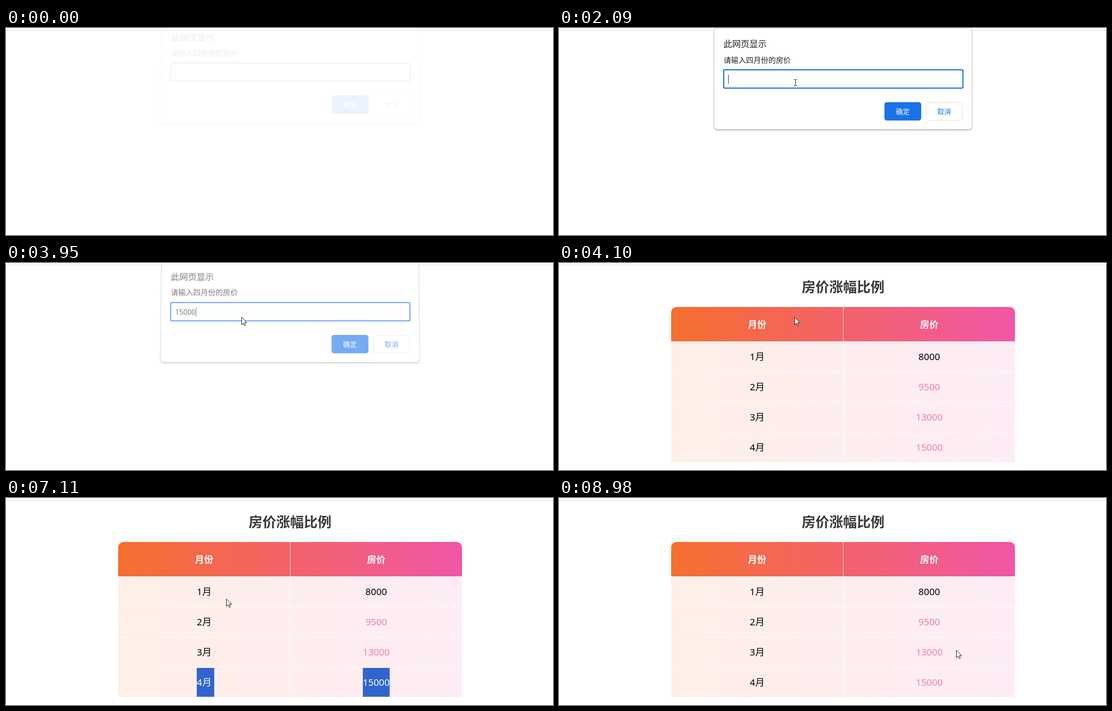
Recreate the animation shown at these times as an HTML page. Size 1190 by 452 pixels, loop 9.57 s.

```html
<!DOCTYPE html>
<html lang="zh">
<head>
<meta charset="utf-8">
<title>房价涨幅比例</title>
<style>
  html, body { margin: 0; width: 100%; height: 100%; overflow: hidden; background: #fff; }
  svg { display: block; }
  text { font-family: "Noto Sans", "Noto Sans CJK SC", "Noto Sans CJK", sans-serif; }
  .layer { position: absolute; left: 0; top: 0; }
  #dialog {
    position: absolute; left: 338px; top: 1px; width: 560px; height: 220px;
    background: #fff; border-radius: 6px;
    box-shadow: 0 0 1.5px rgba(0,0,0,.55), 0 2px 4px rgba(0,0,0,.3);
  }
  #dialog svg { position: absolute; left: -338px; top: -1px; }
</style>
</head>
<body>
<svg class="layer" width="1190" height="452">
  <defs>
    <linearGradient id="warm" gradientUnits="userSpaceOnUse" x1="244" y1="0" x2="992" y2="0">
      <stop offset="0" stop-color="#f56f2e"/>
      <stop offset="1" stop-color="#f056a6"/>
    </linearGradient>
  </defs>
  <rect y="4" width="1190" height="1" fill="#dadada"/>
  <g id="table">
    <text x="618" y="63" font-size="30" font-weight="700" fill="#3a3a3a" text-anchor="middle">房价涨幅比例</text>
    <path d="M244 171V108a12 12 0 0 1 12-12H980a12 12 0 0 1 12 12V171Z" fill="url(#warm)"/>
    <rect x="244" y="171" width="748" height="264" fill="url(#warm)" opacity=".11"/>
    <path d="M618.5 96V435M244 237.5H992M244 303.5H992M244 369.5H992" stroke="#fff"/>
    <g font-size="20" font-weight="700" fill="#fff" text-anchor="middle">
      <text x="431" y="141.5">月份</text>
      <text x="805.5" y="141.5">房价</text>
    </g>
    <g id="cells" font-size="20.5"></g>
  </g>
</svg>

<div id="dialog">
  <svg width="1190" height="452">
    <text x="358" y="42" font-size="18.75" fill="#202124">此网页显示</text>
    <text x="358" y="75.5" font-size="16.25" fill="#202124">请输入四月份的房价</text>
    <rect id="field" x="358.25" y="91.25" width="520.5" height="40" rx="2.5" fill="#fff"/>
    <text id="typed" x="368" y="118" font-size="15.5" fill="#202124"></text>
    <rect id="caret" y="102" width="1" height="20" fill="#202124"/>
    <rect x="708" y="162" width="80" height="40" rx="5" fill="#1a73e8"/>
    <rect x="798.5" y="162.5" width="79" height="39" rx="4.5" fill="#fff" stroke="#dadce0"/>
    <g font-size="15" text-anchor="middle">
      <text x="748" y="188" fill="#fff" font-weight="500">确定</text>
      <text x="838" y="188" fill="#1a73e8">取消</text>
    </g>
  </svg>
</div>

<svg class="layer" width="1190" height="452">
  <circle id="halo" r="15" fill="#ff0"/>
  <g id="cursor">
    <path id="arrow" d="M.5.5V16.8L4.3 13.2 6.9 18.8 9.3 17.8 6.9 12.2H12Z" fill="#fff" stroke="#000"/>
    <path id="beam" d="M-3 -6.5H0M1 -6.5H4M.5 -6V6M-3 6.5H0M1 6.5H4" fill="none" stroke="#000"/>
  </g>
</svg>

<script>
const LOOP = 9570;
const ROW_TOP = 171, ROW_STEP = 66;
const MONTH_X = 415, DIGIT = 11.73;
const PRICES = ["8000", "9500", "13000", "15000"];

// Pointer way points: time, x, y
const PATH = [
  [470, 79, 110], [670, 399, 77], [800, 399, 77], [1150, 542, 64],
  [1610, 542, 64], [1870, 514, 119], [3879, 514, 119],
  [3880, 512, 118], [4960, 512, 118], [5290, 361, 399], [5400, 361, 399],
  [5840, 894, 406], [6770, 894, 406], [7110, 479, 220], [7170, 479, 220],
  [7250, 412, 188], [7330, 412, 188], [7770, 864, 332]
];
// Mouse button held: from, to, strength of the halo
const PRESSES = [
  [1200, 1470, 1], [1880, 2090, 1], [5330, 6370, 1],
  [7270, 7970, 1], [7970, 8100, .5], [8910, 8980, 1]
];
const KEYS = [2620, 2950, 3220, 3350, 3550];

const $ = id => document.getElementById(id);
const show = (el, on) => el.setAttribute("visibility", on ? "visible" : "hidden");
const within = (t, a, b) => t >= a && t < b;

function makeCell(x, y, label, color, width) {
  const text = (tx, ty, fill) => `<text x="${tx}" y="${ty}" fill="${fill}">${label}</text>`;
  $("cells").insertAdjacentHTML("beforeend",
    text(x, y + 41, color) +
    `<svg x="${x}" y="${y + 2}" width="0" height="63">` +
    `<rect width="${width}" height="63" fill="#3264cf"/>${text(0, 39, "#fff")}</svg>`);
  return { x, width, mark: $("cells").lastElementChild };
}

const rows = PRICES.map((price, i) => {
  const y = ROW_TOP + i * ROW_STEP, w = price.length * DIGIT;
  return [
    makeCell(MONTH_X, y, i + 1 + "月", "#000", 38),
    makeCell(805.5 - w / 2, y, price, i ? "#f07cb4" : "#000", w)
  ];
});

function pointer(t) {
  let i = 0;
  while (i < PATH.length - 2 && t >= PATH[i + 1][0]) i++;
  const [t0, x0, y0] = PATH[i], [t1, x1, y1] = PATH[i + 1];
  const k = Math.min(1, Math.max(0, (t - t0) / (t1 - t0)));
  return { x: Math.round(x0 + (x1 - x0) * k), y: Math.round(y0 + (y1 - y0) * k) };
}

function drawSelection(t, p) {
  let first = 9;
  if (within(t, 5330, 7270)) first = 3;
  if (within(t, 7270, 8910)) first = 0;
  const end = first === 3 && t >= 5840 ? { x: 894, y: 406 } : p;
  const last = Math.floor((end.y - ROW_TOP) / ROW_STEP);
  rows.forEach((cells, r) => cells.forEach(({ x, width, mark }) => {
    let w = 0;
    if (r >= first && r < last) w = width;
    else if (r >= first && r === last) {
      w = Math.max(0, Math.floor((end.x - x) / DIGIT + .5) * DIGIT);
    }
    mark.setAttribute("width", Math.min(w, width));
  }));
}

// Dialog swings in and out: opacity, lift, tilt
function dialogPose(t) {
  if (t < 70) return [.09, -15, 5.7];
  if (t < 140) return [.65, -5, 2];
  if (t < 3950) return [1, 0, 0];
  if (t < 4030) return [.6, -5, 2];
  return t < 4100 ? [.1, -15, 5.7] : [0, 0, 0];
}

function drawDialog(t) {
  const [alpha, lift, tilt] = dialogPose(t), d = $("dialog");
  d.style.display = alpha ? "block" : "none";
  d.style.opacity = alpha;
  d.style.transform = tilt ? `translateY(${lift}px) perspective(1000px) rotateX(${tilt}deg)` : "none";

  const focused = !within(t, 1270, 1940);
  $("field").setAttribute("stroke", focused ? "#1a73e8" : "#dadce0");
  $("field").setAttribute("stroke-width", focused ? 2.5 : 1);

  const count = KEYS.filter(k => t >= k).length;
  $("typed").textContent = "15000".slice(0, count);
  $("caret").setAttribute("x", 368 + 9 * count);
  show($("caret"), focused && !within(t, 530, 1060) && !within(t, 2550, 2620));
}

function drawPointer(t, p) {
  const beam = within(t, 640, 3880);
  show($("arrow"), t >= 470 && !beam);
  show($("beam"), beam);
  $("cursor").setAttribute("transform", `translate(${p.x} ${p.y})`);
  const press = PRESSES.find(([a, b]) => within(t, a, b));
  $("halo").setAttribute("cx", p.x);
  $("halo").setAttribute("cy", p.y);
  $("halo").setAttribute("opacity", press ? .47 * press[2] : 0);
}

function draw(t) {
  const p = pointer(t);
  $("table").style.display = t >= 4030 ? "inline" : "none";
  drawSelection(t, p);
  drawDialog(t);
  drawPointer(t, p);
}

const start = performance.now();
function tick() {
  draw((performance.now() - start) % LOOP);
  requestAnimationFrame(tick);
}
tick();
</script>
</body>
</html>
```
